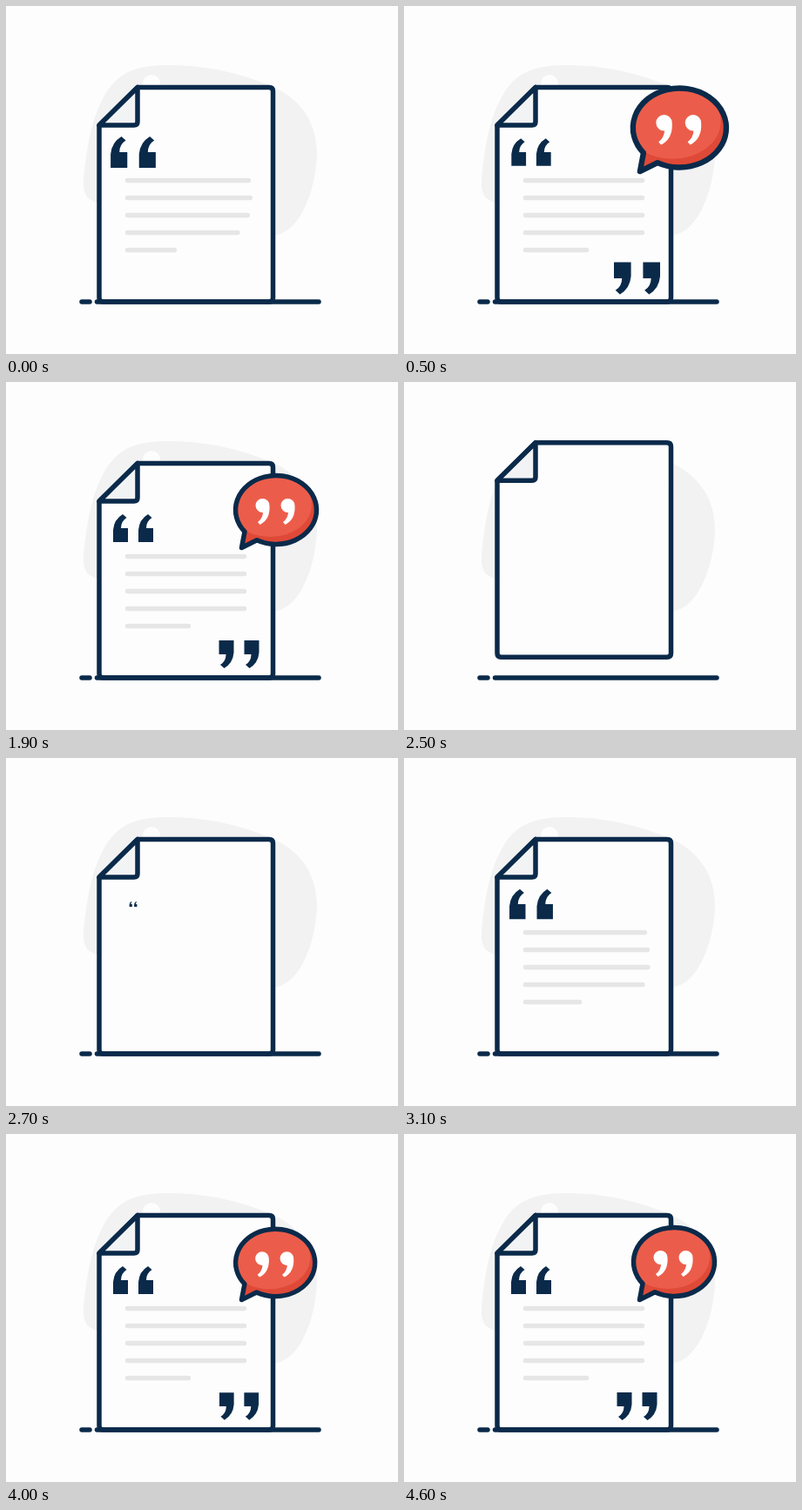
These frames come from a looping animation (450 by 400 pixels, 4700 ms). An HTML page:

```html
<!DOCTYPE html>
<html lang="en">
<head>
<meta charset="utf-8">
<title>Quote page</title>
<style>
  html, body { margin: 0; width: 100%; height: 100%; overflow: hidden; background: #fdfdfd; }
  svg { display: block; }
  .ink { stroke: #0b2a4a; stroke-width: 5.5; stroke-linecap: round; stroke-linejoin: round; }
</style>
</head>
<body>
<svg width="450" height="400" viewBox="0 0 450 400" fill="none">
  <defs>
    <path id="mark" d="M0 32V18Q1 6 11 0L15.500 4Q9 8 9 16H17V32Z"/>
    <path id="comma" d="M0 8A8 8 0 0 1 16 8Q17 24 5 30L2.500 27Q8 23 8.500 16A8 8 0 0 1 0 8Z"/>
    <g id="pair" fill="#0b2a4a">
      <use href="#mark" x="-23" y="-16"/>
      <use href="#mark" x="6" y="-16"/>
    </g>
    <path id="balloon" d="M274 172L270.500 190.500L288 181.800A46.500 39.500 0 1 0 274 172Z"/>
    <clipPath id="inside"><use href="#balloon"/></clipPath>
  </defs>

  <path fill="#f2f2f2" d="M104 226C92 222 88 215 89 200C93 160 98 130 112 105C128 75 150 68 190 68C240 68 290 84 315 97C345 115 357 140 357 172C355 210 340 255 312 263C250 275 180 226 104 226Z"/>
  <circle cx="167" cy="89" r="10" fill="#fdfdfd"/>

  <g id="page">
    <path id="corner" fill="#fdfdfd" d="M104 91H151V137H104Z"/>
    <path class="ink" fill="#fdfdfd" d="M151 93.500H302Q306.500 93.500 306.500 98V335.500Q306.500 340 302 340H111.500Q107 340 107 335.500V137Z"/>
    <path class="ink" fill="#f2f3f4" d="M151 93.500V133Q151 137 147 137H107Z"/>
  </g>
  <path class="ink" d="M87 340H96M104.500 340H359"/>

  <g id="lines" stroke="#e6e6e6" stroke-width="5.500" stroke-linecap="round"></g>
  <use id="open" href="#pair"/>
  <use id="close" href="#pair"/>

  <g id="bubble">
    <use href="#balloon" fill="#df4937"/>
    <ellipse cx="303" cy="141" rx="48" ry="37" fill="#eb5d4a" clip-path="url(#inside)"/>
    <use href="#balloon" class="ink"/>
    <g fill="#fff">
      <use href="#comma" x="286.500" y="134"/>
      <use href="#comma" x="315.500" y="134"/>
    </g>
  </g>
</svg>
<script>
const LOOP = 4700, CYCLE = 3070;
const $ = id => document.getElementById(id);
const clamp = p => Math.min(1, Math.max(0, p));
const swing = p => (1 - Math.cos(Math.PI * p)) / 2;
const hump = (t, from, to) => Math.sin(Math.PI * clamp((t - from) / (to - from)));

const lines = [134, 134, 134, 134, 70].map((length, i) => {
  const el = document.createElementNS('http://www.w3.org/2000/svg', 'path');
  $('lines').append(el);
  return { el, length, y: 200.5 + 20 * i, start: -306 + 50 * i };
});

// Springy scale: rise, overshoot, dip, rest.
function pop(t) {
  if (t <= 0) return 0;
  if (t < 210) return 1.28 * Math.sin(Math.PI / 2 * t / 210);
  if (t < 570) return 1.28 - 0.31 * swing((t - 210) / 360);
  return 0.97 + 0.03 * swing(clamp((t - 570) / 600));
}

function backOut(p, s = 1.17) {
  const u = clamp(p) - 1;
  return 1 + (s + 1) * u ** 3 + s * u * u;
}

function leave(t) {
  const p = clamp((t - 1930) / 220);
  return Math.max(0, 1 - p * p * (2.7 * p - 1.7));
}

function place(el, x, y, scale, turn = 0) {
  el.setAttribute('display', scale > 0.005 ? 'inline' : 'none');
  el.setAttribute('transform', `translate(${x} ${y}) rotate(${turn}) scale(${scale})`);
}

function drawPage(phase) {
  const flight = (phase - 2400) / 123;
  const leap = Math.abs(flight) < 1 ? -70 * (1 - flight * flight) : 0;
  const crouch = hump(phase, 2150, 2277);
  const squash = Math.max(0.6 * crouch, hump(phase, 2523, 2683));
  const y = 340 + leap + 11 * crouch;
  $('page').setAttribute('transform',
    `translate(206.5 ${y}) scale(${1 + 0.16 * squash} ${1 - 0.08 * squash}) translate(-206.5 -340)`);
  $('corner').setAttribute('display', leap < -1 ? 'inline' : 'none');
}

function draw(time) {
  const phase = time % LOOP % CYCLE;
  const t = phase < 2600 ? phase : phase - CYCLE;
  const out = leave(t);
  const late = pop(t - 130) * out;

  drawPage(phase);
  for (const { el, length, y, start } of lines) {
    const grow = backOut((t - start) / 400) * out;
    el.setAttribute('d', grow > 0.005 ? `M139.500 ${y}h${length * grow}` : '');
  }
  place($('open'), 146, 168, pop(t + 390) * out);
  place($('close'), 267.5, 313, late, 180);
  place($('bubble'), 268, 193, late);
  $('bubble').setAttribute('transform', $('bubble').getAttribute('transform') + ' translate(-268 -193)');
}

let began;
function tick(now) {
  began ??= now;
  draw(now - began);
  requestAnimationFrame(tick);
}
draw(0);
requestAnimationFrame(tick);
</script>
</body>
</html>
```
